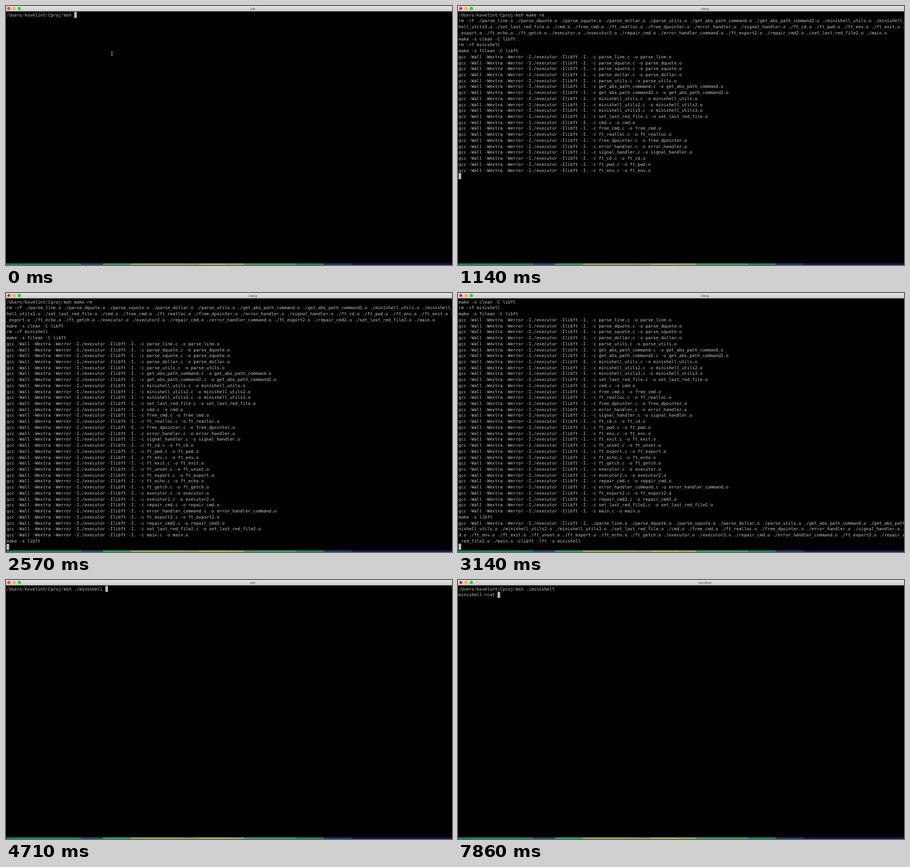
Recreate the animation shown at these times as an HTML page with a canvas. Size 800 px wide and 465 px high, loop 8000 ms.

```html
<!DOCTYPE html>
<html lang="en">
<head>
<meta charset="utf-8">
<title>Terminal</title>
<style>
html, body { margin: 0; width: 100%; height: 100%; overflow: hidden; background: #000; }
canvas { display: block; }
</style>
</head>
<body>
<canvas id="stage" width="800" height="465"></canvas>
<script>
const ctx = document.getElementById('stage').getContext('2d');
const LOOP = 8000, COLS = 188, ROWS = 42;
const CELL_W = 4.664, CELL_H = 10.725, LEFT = 1, TOP = 10.6;
const GRAY = '#c7c7c7', RED = '#f4545a';
const PROMPT = '/Users/kovelint/Cproj/msh ';

const files = ('parse_line parse_dquote parse_squote parse_dollar parse_utils ' +
  'get_abs_path_command get_abs_path_command2 minishell_utils minishell_utils2 ' +
  'minishell_utils3 set_last_red_file cmd free_cmd ft_realloc free_dpointer ' +
  'error_handler signal_handler ft_cd ft_pwd ft_env ft_exit ft_unset ft_export ' +
  'ft_echo ft_getch executor executor2 repair_cmd error_handler_command ' +
  'ft_export2 repair_cmd2 set_last_red_file2 main').split(' ');
const objects = files.map(f => `./${f}.o`).join(' ');
const gcc = 'gcc -Wall -Wextra -Werror -I./executor -Ilibft -I. ';

const clean = PROMPT + 'make re\n' +
  `rm -rf ${objects}\nmake -s clean -C libft\nrm -rf minishell\nmake -s fclean -C libft\n`;
const build = n => clean + files.slice(0, n).map(f => `${gcc}-c ${f}.c -o ${f}.o\n`).join('');
const compiled = build(files.length) + 'make -s libft\n';
const linked = compiled + `${gcc}${objects} -Llibft -lft -o minishell\n`;
const shell = PROMPT + './minishell\nminishell->';

// Start time, terminal contents, window title
const steps = [
  [0, PROMPT, 'zsh'],
  [140, PROMPT + 'm', 'zsh'],
  [290, PROMPT + 'mak', 'zsh'],
  [430, PROMPT + 'make ', 'zsh'],
  [570, PROMPT + 'make r', 'zsh'],
  [710, PROMPT + 'make re', 'zsh'],
  [860, build(5), 'make'],
  [1000, build(13), 'clang'],
  [1140, build(20), 'clang'],
  [1290, build(25), 'clang'],
  [1430, build(30), 'clang'],
  [1570, compiled, 'clang'],
  [3140, linked, 'clang'],
  [3290, linked + PROMPT, 'clang'],
  [3430, linked + PROMPT + 'cl', 'zsh'],
  [3570, linked + PROMPT + 'clear', 'zsh'],
  [3710, PROMPT, 'zsh'],
  [4290, PROMPT + '.', 'zsh'],
  [4430, PROMPT + './', 'zsh'],
  [4570, PROMPT + './mi', 'zsh'],
  [4710, PROMPT + './minishell ', 'zsh'],
  [5710, shell, 'zsh'],
  [6000, shell, 'minishell'],
  [7570, shell + 'c', 'minishell'],
  [7710, shell + 'ca', 'minishell'],
  [7860, shell + 'cat ', 'minishell']
];

// Desktop strip under the window: left edge and colour
const strip = [[0, '#167a6b'], [25, '#17806c'], [135, '#1c506b'], [174, '#2f9a68'],
  [224, '#8da455'], [320, '#7fa258'], [347, '#9cb25a'], [395, '#8dac58'],
  [427, '#3a9a66'], [520, '#1a806f'], [570, '#1b3a68'], [620, '#17184f']];

function rect(x, y, w, h, color) {
  ctx.fillStyle = color;
  ctx.fillRect(x, y, w, h);
}

function dot(x, r, color) {
  ctx.fillStyle = color;
  ctx.beginPath();
  ctx.arc(x, 4.4, r, 0, 7);
  ctx.fill();
}

function print(text, x, y, color) {
  ctx.fillStyle = color;
  ctx.fillText(text, x, y);
}

function drawBar(title) {
  const shade = ctx.createLinearGradient(0, 0, 0, 9);
  shade.addColorStop(0, '#e2e2e2');
  shade.addColorStop(1, '#cecece');
  rect(0, 0, 800, 9.6, shade);
  dot(5, 2.9, '#f9453f');
  dot(14.5, 2.9, '#fdb527');
  dot(24, 2.9, '#2bd03c');
  if (title !== 'zsh') dot(5, 1.1, '#7a0a08');
  ctx.font = '5.8px Inter, sans-serif';
  ctx.textAlign = 'center';
  print(title, 442.6, 6.5, '#454545');
}

function drawText(text) {
  const rows = text.split('\n').flatMap(line => line.match(new RegExp(`.{1,${COLS}}`, 'g')) || ['']);
  const view = rows.slice(-ROWS);
  ctx.font = '7.747px "DejaVu Sans Mono", monospace';
  ctx.textAlign = 'left';
  view.forEach((row, i) => {
    const y = TOP + i * CELL_H + 8.1;
    if (row.startsWith(PROMPT)) {
      const n = PROMPT.length;
      print(row.slice(0, n).replace(/\//g, ' ') + row.slice(n), LEFT, y, GRAY);
      print(PROMPT.replace(/[^/]/g, ' '), LEFT, y, RED);
    } else {
      print(row, LEFT, y, GRAY);
    }
  });
  const last = view.length - 1;
  rect(LEFT + view[last].length * CELL_W, TOP + last * CELL_H, CELL_W, CELL_H, '#bdbdbd');
}

function drawPointer() {
  rect(189.5, 82.5, 1, 6, '#b0b0b0');
  rect(188.3, 81.8, 3.4, 0.9, '#b0b0b0');
  rect(188.3, 88, 3.4, 0.9, '#b0b0b0');
}

function frame(now) {
  const t = now % LOOP;
  const [, text, title] = steps.findLast(s => s[0] <= t);
  ctx.textRendering = 'geometricPrecision';
  rect(0, 0, 800, 465, '#000');
  drawBar(title);
  drawText(text);
  if (t < 140) drawPointer();
  for (const [x, color] of strip) rect(x, 462, 800 - x, 3, color);
  requestAnimationFrame(frame);
}
requestAnimationFrame(frame);
</script>
</body>
</html>
```
